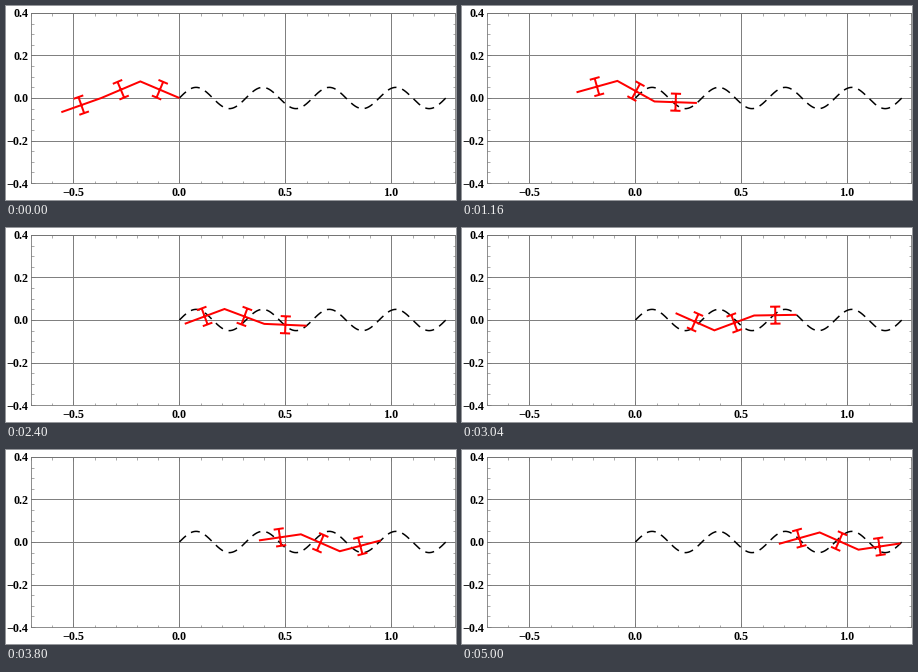
A matplotlib script that plays this animation: 450x194 px, repeating every 5040 ms.

```python
import numpy as np
import matplotlib.pyplot as plt
from matplotlib.animation import FuncAnimation
from matplotlib.ticker import MultipleLocator

W, H, DPI = 450, 194, 64
PX = 72 / DPI                  # points per pixel
LEFT, RIGHT, TOP, BOTTOM = 25, 449, 6.9, 177.1
FRAMES, INTERVAL = 126, 40

LINK = 0.2                     # link length
AXLE, WHEEL = 0.04, 0.024      # half lengths of axle and wheel
AMP, FREQ = 0.05, 20           # path y = AMP sin(FREQ x)
STEP, SUBSTEPS = 0.01, 20      # head advance per frame
START = np.array([-0.4, 0.4, 0.34])

plt.rcParams["font.family"] = "Liberation Serif"
plt.rcParams["font.weight"] = "bold"


def path(x):
    return AMP * np.sin(FREQ * x)


def axes_of(angle):
    """Unit vectors along and across a link."""
    c, s = np.cos(angle), np.sin(angle)
    return np.array([c, s]), np.array([-s, c])


def turn_rates(x, angles):
    """Link rotation per unit of x when no wheel slips sideways."""
    vel = np.array([1, AMP * FREQ * np.cos(FREQ * x)])
    rates = []
    for angle in angles:
        _, across = axes_of(angle)
        slip = vel @ across
        rates.append(slip / (LINK / 2))
        vel = vel - 2 * slip * across
    return np.array(rates)


def solve():
    angles, poses = START.copy(), []
    h = STEP / SUBSTEPS
    for i in range(FRAMES):
        poses.append(angles.copy())
        for k in range(SUBSTEPS):
            x = i * STEP + k * h
            mid = angles + h / 2 * turn_rates(x, angles)
            angles = angles + h * turn_rates(x + h / 2, mid)
    return poses


def outline(i):
    """Body polyline and wheel sets, separated by NaN points."""
    gap = np.full(2, np.nan)
    joint = np.array([i * STEP, path(i * STEP)])
    body, wheels = [joint], []
    for angle in poses[i]:
        along, across = axes_of(angle)
        center = joint - along * LINK / 2
        top, bottom = center + AXLE * across, center - AXLE * across
        wheels += [gap, top, bottom]
        for end in (top, bottom):
            wheels += [gap, end - WHEEL * along, end + WHEEL * along]
        joint = joint - along * LINK
        body.append(joint)
    return np.array(body + wheels).T


poses = solve()

fig = plt.figure(figsize=(W / DPI, H / DPI), dpi=DPI, facecolor="white")
ax = fig.add_axes([LEFT / W, 1 - BOTTOM / H,
                   (RIGHT - LEFT) / W, (BOTTOM - TOP) / H])
ax.set(xlim=(-0.7, 1.3), ylim=(-0.4, 0.4))
ax.xaxis.set_major_locator(MultipleLocator(0.5))
ax.xaxis.set_minor_locator(MultipleLocator(0.1))
ax.yaxis.set_major_locator(MultipleLocator(0.2))
ax.yaxis.set_minor_locator(MultipleLocator(0.05))
ax.set_axisbelow(True)
ax.grid(color="0.5", lw=PX)
for spine in ax.spines.values():
    spine.set(color="0.45", linewidth=0.8 * PX)
ax.tick_params(which="both", direction="in", top=True, right=True,
               color="0.45", width=0.6 * PX)
ax.tick_params(which="major", length=4 * PX, labelsize=12 * PX)
ax.tick_params(which="minor", length=2.5 * PX)
ax.tick_params(axis="x", pad=4 * PX)
ax.tick_params(axis="y", pad=3 * PX)

xs = np.linspace(0, 0.4 * np.pi, 600)
ax.plot(xs, path(xs), color="black", lw=1.5 * PX, dashes=(6, 4),
        dash_capstyle="butt")
robot, = ax.plot([], [], color="red", lw=2 * PX, solid_capstyle="butt",
                 solid_joinstyle="miter", zorder=3)


def update(i):
    robot.set_data(*outline(i))
    return robot,


anim = FuncAnimation(fig, update, frames=FRAMES, interval=INTERVAL,
                     init_func=lambda: update(0), repeat=True, repeat_delay=0)
plt.show()
```
